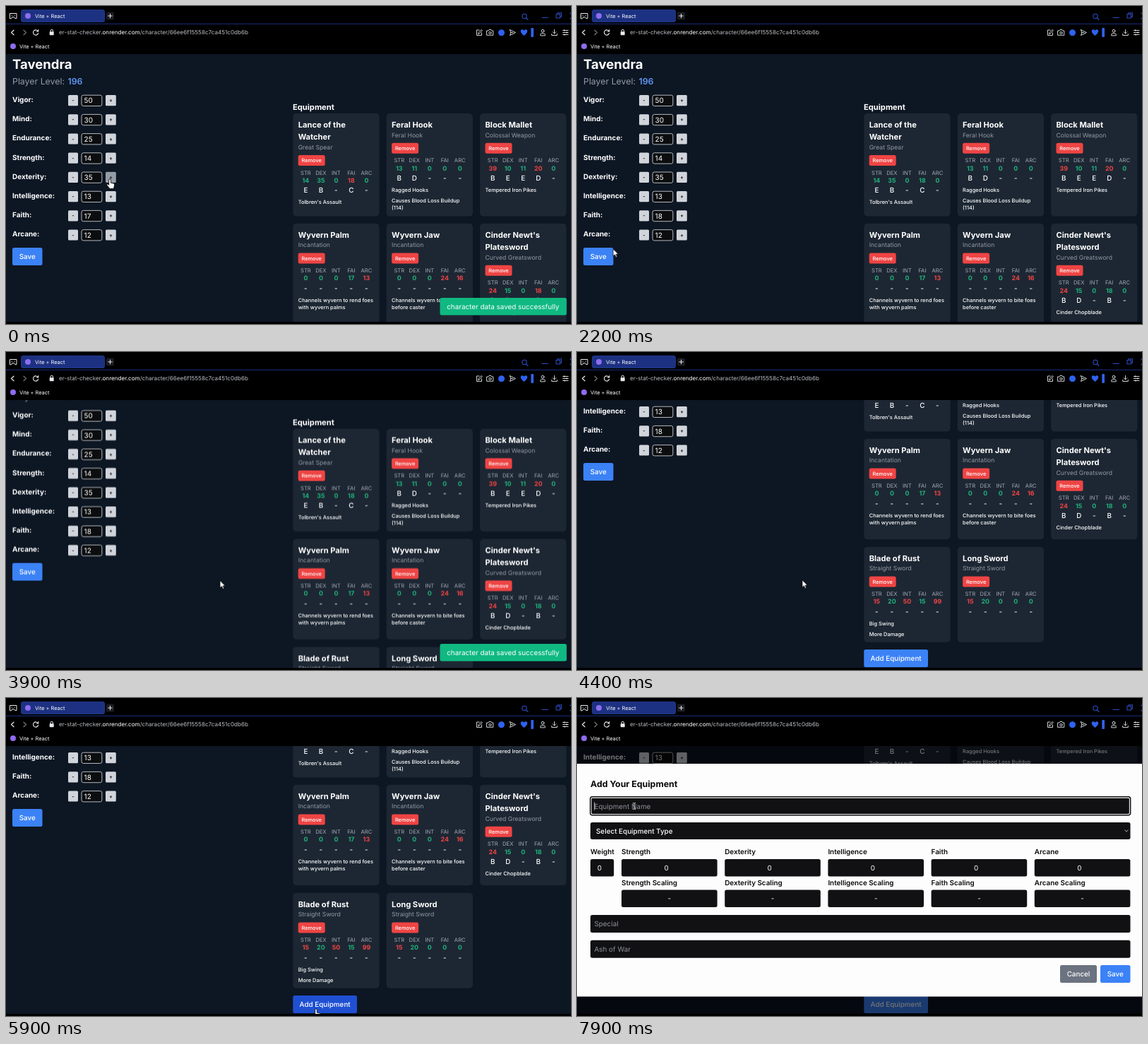
Animation, 800 px wide and 450 px high, one loop 8 s. Source, as an HTML page:

```html
<!DOCTYPE html>
<html lang="en">
<head>
<meta charset="utf-8">
<title>Character stats</title>
<style>
html, body { margin: 0; width: 100%; height: 100%; overflow: hidden; background: #000; }
svg { display: block; width: 100%; height: 100%; }
text { font-family: Inter, "Noto Sans", sans-serif; text-rendering: geometricPrecision; white-space: pre; }
.line { fill: none; stroke: #e8eaee; stroke-linecap: round; stroke-linejoin: round; }

/* every animation shares one 8 s loop; steps unless stated */
.anim { animation: 8s step-end infinite; }
.scroll { animation-name: scroll; animation-timing-function: linear; }
.move { animation-name: move; animation-timing-function: ease-in-out; }
.toast { animation-name: toast; }
.modal { animation-name: modal; }
.focus { animation-name: focus; }
.faith-old { animation-name: faith-old; }
.faith-new { animation-name: faith-new; }
.level-old { animation-name: level-old; }
.level-new { animation-name: level-new; }
.met { animation-name: met; }
.hover-dex { animation-name: hover-dex; }
.hover-int { animation-name: hover-int; }
.hover-faith { animation-name: hover-faith; }
.hover-save { animation-name: hover-save; }
.hover-add { animation-name: hover-add; }
.hand { animation-name: hand; }
.arrow { animation-name: arrow; }
.beam { animation-name: beam; }

@keyframes scroll {
  0%, 46.8% { transform: translateY(0); }
  48.75% { transform: translateY(-43px); }
  51.5% { transform: translateY(-140px); }
  53.75%, 100% { transform: translateY(-185px); }
}
@keyframes move {
  0%, 3.5% { transform: translate(147px, 245px); }
  10%, 21.25% { transform: translate(146px, 298px); }
  30%, 39.4% { transform: translate(32px, 353px); }
  46.5%, 48.75% { transform: translate(303px, 323.5px); }
  55%, 58.75% { transform: translate(319px, 322.7px); }
  70%, 78% { transform: translate(439px, 440px); }
  90%, 100% { transform: translate(81px, 153px); }
}
@keyframes toast { 0% { opacity: 1; } 14% { opacity: 0; } 32.5% { opacity: 1; } 52% { opacity: 0; } }
@keyframes modal { 0% { opacity: 0; } 76.25%, 100% { opacity: 1; } }
@keyframes focus { 0% { opacity: 0; } 91.25%, 100% { opacity: 1; } }
@keyframes faith-old { 0% { opacity: 1; } 11.25%, 100% { opacity: 0; } }
@keyframes faith-new { 0% { opacity: 0; } 11.25%, 100% { opacity: 1; } }
@keyframes level-old { 0% { opacity: 1; } 32.5%, 100% { opacity: 0; } }
@keyframes level-new { 0% { opacity: 0; } 32.5%, 100% { opacity: 1; } }
@keyframes met { 0% { fill: #ef4444; } 11.25%, 100% { fill: #1fb27c; } }
@keyframes hover-dex { 0% { fill: #959ca6; } 5%, 100% { fill: #d1d5db; } }
@keyframes hover-int { 0% { fill: #d1d5db; } 6.2% { fill: #959ca6; } 7.4%, 100% { fill: #d1d5db; } }
@keyframes hover-faith { 0% { fill: #d1d5db; } 8.5% { fill: #959ca6; } 22.5%, 100% { fill: #d1d5db; } }
@keyframes hover-save { 0% { fill: #3b82f6; } 28.5% { fill: #1f50d2; } 41.2%, 100% { fill: #3b82f6; } }
@keyframes hover-add { 0% { fill: #3b82f6; } 68% { fill: #1f50d2; } 76.25%, 100% { fill: #3b82f6; } }
@keyframes hand { 0% { opacity: 1; } 22.5% { opacity: 0; } 28.5% { opacity: 1; } 41.2% { opacity: 0; } 68% { opacity: 1; } 76.25%, 100% { opacity: 0; } }
@keyframes arrow { 0% { opacity: 0; } 22.5% { opacity: 1; } 28.5% { opacity: 0; } 41.2% { opacity: 1; } 68% { opacity: 0; } 76.25% { opacity: 1; } 88.5%, 100% { opacity: 0; } }
@keyframes beam { 0% { opacity: 0; } 88.5%, 100% { opacity: 1; } }
</style>
</head>
<body>
<svg viewBox="0 0 800 450">
  <defs><clipPath id="view"><path d="M0 68H800V447H0z"/></clipPath></defs>
  <path d="M0 0H800V450H0z"/>
  <g clip-path="url(#view)">
    <path d="M0 68H800V447H0z" fill="#0d1623"/>
    <g id="page" class="anim scroll"></g>
    <g id="toast" class="anim toast"></g>
    <g id="modal" class="anim modal"></g>
  </g>
  <g id="chrome">
    <path d="M0 25.3H800" stroke="#14256a" stroke-width="1.2"/>
    <rect x="21.5" y="5.5" width="118" height="17" rx="2.5" fill="#1d3182" stroke="#2945a8" stroke-width=".7"/>
    <circle cx="31" cy="14" r="4" fill="#8d6cf0"/>
    <circle cx="10" cy="57" r="4" fill="#8d6cf0"/>
    <rect x="142" y="8.5" width="11" height="11" rx="2" fill="#1a1c22"/>
    <g class="line">
      <path d="M147.5 11.2v5.6M144.7 14h5.6"/>
      <path d="M5.5 17.5V10.5H15V17.5H12.7L11.6 15.8H8.9L7.8 17.5zM8.2 13.2h.3M12 13.2h.3"/>
      <path d="M11 34.2L7.5 37.5L11 40.8" stroke-width="1.2"/>
      <path d="M25 34.2L28.5 37.5L25 40.8" stroke="#777" stroke-width="1.2"/>
      <path d="M45.3 35.8A3.6 3.6 0 1 0 45.6 38.5M45.8 33.6V36H43.4" stroke-width="1.1"/>
      <path d="M63 36.5V35a1.7 1.7 0 0 1 3.4 0v1.5"/>
      <g stroke-width=".9">
        <path d="M670 34h-3.5v7.5h7V38M668.7 39.5l.4-2 4-4 1.3 1.3-4 4z"/>
        <path d="M681 35h2l1-1.5h2.8l1 1.5h2v6.3H681z"/>
        <circle cx="685.4" cy="38" r="1.6"/>
        <path d="M713.5 33.7l8 3.9-8 3.9 1.3-3.9zM714.8 37.6h3"/>
        <circle cx="760" cy="35.3" r="1.9"/>
        <path d="M756.7 41.5v-1q0-1.7 2-1.7h2.6q2 0 2 1.7v1z"/>
        <path d="M776.5 33.5v5.5m-2.3-2.3l2.3 2.3 2.3-2.3M772.7 39.5v2h7.6v-2"/>
        <path d="M788.5 34.5h7.5M788.5 37.5h7.5M788.5 40.5h7.5M790.5 33.7v1.6M794 36.7v1.6M791 39.7v1.6"/>
      </g>
      <g stroke="#2c4cc4" stroke-width="1.1">
        <circle cx="734" cy="14.5" r="3.2"/>
        <path d="M736.5 17L739 19.5M759 16.5h8.5M779 11.5h5.5v5.5H779zM781 11.5V9.7h5.5v5.5h-2M799 10l4 4-4 4"/>
      </g>
    </g>
    <rect x="61.7" y="36.3" width="6" height="5" rx=".8" fill="#e8eaee"/>
    <circle cx="701.5" cy="37.7" r="4.5" fill="#2f62f0"/>
    <path d="M733.5 42q-4.8-3.6-4.8-6.2a2.5 2.5 0 0 1 4.8-1 2.5 2.5 0 0 1 4.8 1q0 2.6-4.8 6.2z" fill="#2f62f0"/>
    <rect x="743.3" y="31" width="3.7" height="13" rx="1" fill="#2f62f0"/>
  </g>
  <g clip-path="url(#view)">
    <g class="anim move">
      <path class="anim hand" d="M-1.3 1.2a1.3 1.3 0 0 1 2.6 0V5.2l4 .8q1.5.4 1.3 2l-.8 4.2q-.3 1.2-1.5 1.2H.6q-1 0-1.6-.9l-3.4-4.6q.8-1.5 2.1-.5l1 .9z" fill="#fff" stroke="#000" stroke-width=".8"/>
      <path class="anim arrow" d="M0 0V10.2L2.4 8 4 11.7 5.7 11 4.1 7.4H7.4z" fill="#fff" stroke="#000" stroke-width=".7"/>
      <path class="anim beam" d="M-2-4.5Q0-4.5 0-3.5 0-4.5 2-4.5M0-3.5V3.5M-2 4.5Q0 4.5 0 3.5 0 4.5 2 4.5" fill="none" stroke="#d5d7da"/>
    </g>
  </g>
</svg>
<script>
const put = (id, html) => document.getElementById(id).insertAdjacentHTML("beforeend", html);

const text = (x, y, str, size, { fill = "#fff", weight = 400, anchor = "start", anim = "" } = {}) =>
  `<text x="${x}" y="${y}" font-size="${size}" fill="${fill}" font-weight="${weight}" text-anchor="${anchor}" class="${anim && "anim " + anim}">${str}</text>`;
const mid = (x, y, str, size, opts) => text(x, y, str, size, { ...opts, anchor: "middle" });
const box = (x, y, w, h, fill, rx = 2.5, anim = "", extra = "") =>
  `<rect x="${x}" y="${y}" width="${w}" height="${h}" rx="${rx}" fill="${fill}" class="${anim && "anim " + anim}" ${extra}/>`;
const button = (x, y, w, label, fill = "#3b82f6", anim = "") =>
  box(x, y, w, 25, fill, 2.5, anim) + mid(x + w / 2, y + 16.1, label, 9.87, { weight: 500 });

const GREEN = "#1fb27c", RED = "#ef4444", MUTED = "#9299a4";

// browser bar
put("chrome",
  text(41, 16.7, "Vite + React", 7.4) +
  text(19, 59.7, "Vite + React", 7.4) +
  text(75, 40.4, '<tspan fill="#b9bcc2">er-stat-checker</tspan>.onrender.com<tspan fill="#b9bcc2">/character/66ee6f15558c7ca451c0db6b</tspan>', 8.1));

// attributes
function statRow([label, value, hover = ""], i) {
  const y = 126 + i * 27.2;
  const num = (v, anim) => text(110.6, y + 11.3, v, 10, { anim });
  return text(9, y + 10, label + ":", 9.95, { weight: 700 }) +
    box(88, y, 14, 15.2, "#d1d5db", 1.5) + mid(95, y + 10.2, "-", 7.4, { fill: "#111", weight: 600 }) +
    box(107, y + .2, 28.8, 15.3, "#0c0d0f", 2.5, "", 'stroke="#c9ccd1" stroke-width=".9"') +
    (label === "Faith" ? num(17, "faith-old") + num(18, "faith-new") : num(value)) +
    box(141, y, 14.8, 15.2, "#d1d5db", 1.5, hover) + mid(148.4, y + 10.2, "+", 7.4, { fill: "#111", weight: 600 });
}
const stats = [
  ["Vigor", 50], ["Mind", 30], ["Endurance", 25], ["Strength", 14],
  ["Dexterity", 35, "hover-dex"], ["Intelligence", 13, "hover-int"],
  ["Faith", 17, "hover-faith"], ["Arcane", 12]
];
const level = (n, anim) => text(87.5, 111, n, 12.35, { fill: "#5f95f2", weight: 600, anim });
put("page",
  text(9, 88.6, "Tavendra", 18.5, { weight: 700 }) +
  text(9, 111, "Player Level:", 12.35, { fill: MUTED }) +
  level(196, "level-old") + level(197, "level-new") +
  stats.map(statRow).join("") +
  button(9, 342, 42.5, "Save", "#3b82f6", "hover-save") +
  text(406, 147.4, "Equipment", 11.2, { weight: 700 }));

// equipment: title lines | kind | requirements (! unmet, ~ met later) | scaling | effects
const gear = [
  ["Lance of the/Watcher", "Great Spear", "14 35 0 ~18 0", "EB-C-", "Tolbren's Assault"],
  ["Feral Hook", "Feral Hook", "13 11 0 0 0", "BD---", "Ragged Hooks|Causes Blood Loss Buildup/(114)"],
  ["Block Mallet", "Colossal Weapon", "!39 10 11 !20 0", "BEED-", "Tempered Iron Pikes"],
  ["Wyvern Palm", "Incantation", "0 0 0 17 !13", "-----", "Channels wyvern to rend foes/with wyvern palms"],
  ["Wyvern Jaw", "Incantation", "0 0 0 !24 !16", "-----", "Channels wyvern to bite foes/before caster"],
  ["Cinder Newt's/Platesword", "Curved Greatsword", "!24 15 0 ~18 0", "BD-B-", "Cinder Chopblade"],
  ["Blade of Rust", "Straight Sword", "!15 20 !50 15 !99", "-----", "Big Swing|More Damage"],
  ["Long Sword", "Straight Sword", "!15 20 0 0 0", "-----", ""]
];
const rows = [[152, 145.6], [307.7, 142.6], [460.7, 135]];

function card([title, kind, needs, scaling, effects], i) {
  const x = 406.3 + (i % 3) * 132.4, [top, h] = rows[Math.floor(i / 3)];
  const tx = x + 7.4, lines = title.split("/");
  const y = top + (lines.length - 1) * 17.3;
  let out = box(x, top, 122.3, h, "#1d2733", 5);
  lines.forEach((s, n) => out += text(tx, top + 19.8 + n * 17.3, s, 11.15, { weight: 700 }));
  out += text(tx, y + 33.7, kind, 8.64, { fill: MUTED });
  out += box(tx, y + 41.7, 38, 15, RED) + mid(tx + 19, y + 51.9, "Remove", 7.4, { weight: 500 });
  needs.split(" ").forEach((need, n) => {
    const cx = x + 18.1 + n * 21.5;
    out += mid(cx, y + 69.2, ["STR", "DEX", "INT", "FAI", "ARC"][n], 7.7, { fill: "#a3a9b3" });
    out += mid(cx, y + 80.7, need.replace(/[!~]/, ""), 8.9, {
      fill: need[0] === "!" ? RED : GREEN, weight: 700, anim: need[0] === "~" ? "met" : ""
    });
    out += mid(cx, y + 94.8, scaling[n], 9.87, { weight: 500 });
  });
  let ey = y + 111;
  for (const effect of effects.split("|")) {
    effect.split("/").forEach((s, n) => out += text(tx, ey + n * 9.9, s, 7.45, { weight: 500 }));
    ey += 14.9;
  }
  return out;
}
put("page", gear.map(card).join("") + button(406.3, 606, 90.7, "Add Equipment", "#3b82f6", "hover-add"));

put("toast", box(614.5, 413, 179.3, 24.6, "#10b981") + text(624.2, 428.9, "character data saved successfully", 9.87));

// dialog
const INK = "#111113", HINT = "#8d9198";
const field = (y, hint) => box(19, y, 764.5, 25, INK) + text(24.5, y + 16.3, hint, 9.87, { fill: HINT });
const label = (x, y, s) => text(x, y, s, 9.87, { fill: "#0b0b0d", weight: 600 });

let dialog = '<path d="M0 68H800V447H0z" opacity=".55"/><path d="M0 93H800V422.5H0z" fill="#fdfdfd"/>' +
  text(19, 125.8, "Add Your Equipment", 12.35, { fill: "#0b0b0d", weight: 700 }) +
  field(140.3, "Equipment Name") +
  `<g class="anim focus">
    <rect x="18.7" y="139.8" width="765" height="26" rx="3" fill="none" stroke="#0b0b0d" stroke-width="1.4"/>
    <rect x="20" y="141.1" width="762.4" height="23.4" rx="2" fill="none" stroke="#f5f5f5" stroke-width="1.1"/>
    <path d="M24.8 147.5v11" stroke="#fff" stroke-width=".8"/>
  </g>` +
  box(19, 176, 764.5, 24, INK) + text(27, 191.6, "Select Equipment Type", 9.87, { weight: 500 }) +
  '<path class="line" d="M775.8 187l2.2 2.2 2.2-2.2" stroke-width=".8"/>' +
  label(19, 221.1, "Weight") + box(19, 228, 33.2, 24.6, INK) + mid(31.8, 244, "0", 9.87);

["Strength", "Dexterity", "Intelligence", "Faith", "Arcane"].forEach((name, i) => {
  const x = 63 + i * 146.2;
  dialog += label(x, 221.1, name) + box(x, 228, 135.6, 24.6, INK) + mid(x + 63.5, 244, "0", 9.87) +
    label(x, 264.6, name + " Scaling") + box(x, 271.4, 135.6, 24.6, INK) + mid(x + 67.8, 287.2, "-", 9.87);
});
dialog += field(307, "Special") + field(342.8, "Ash of War") +
  button(684, 378, 52, "Cancel", "#6b7280") + button(741, 378, 42.5, "Save");
put("modal", dialog);
</script>
</body>
</html>
```
